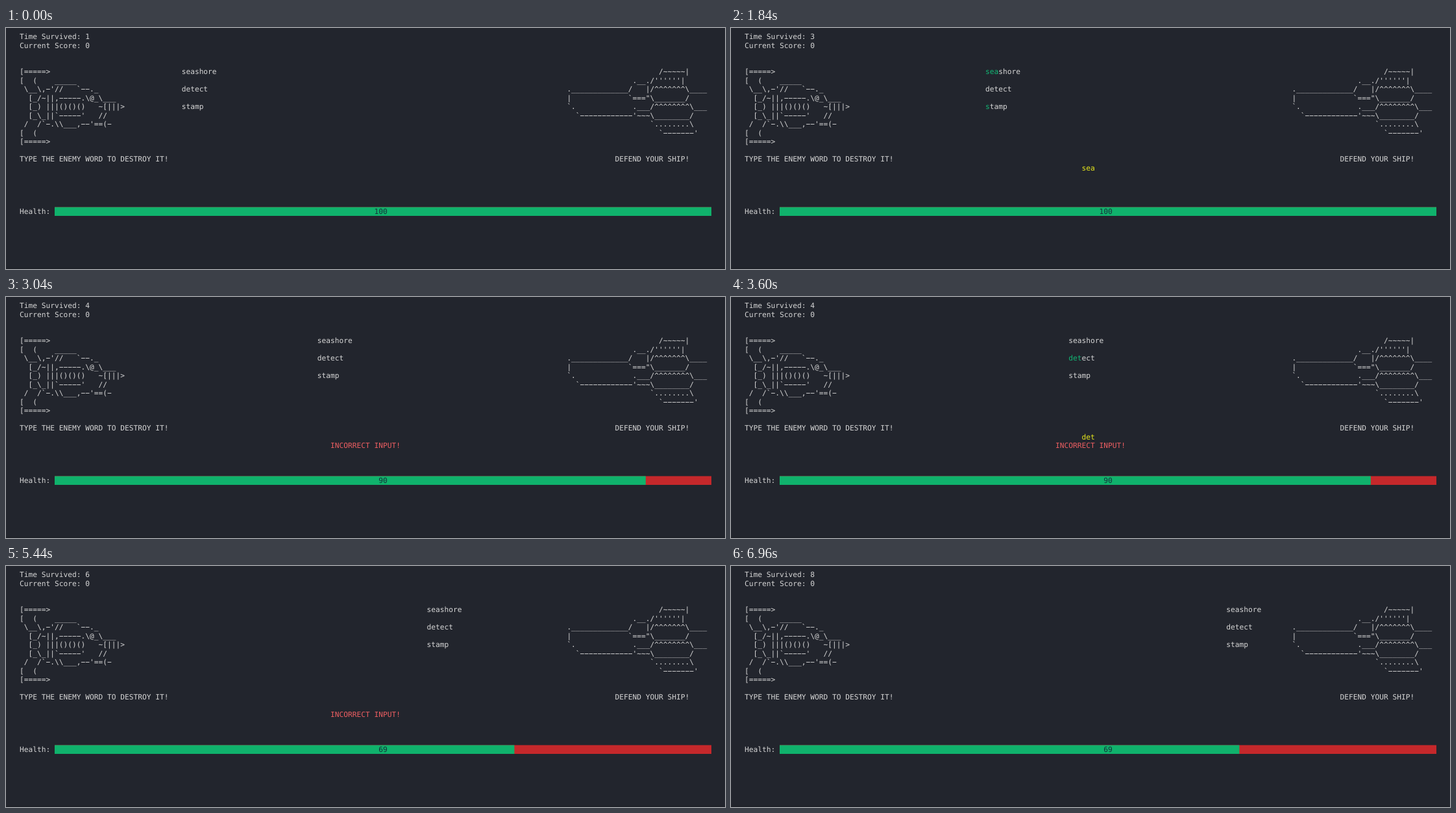
These frames come from a looping animation (1108x372 px, 7040 ms). An HTML page with a canvas:

```html
<!DOCTYPE html>
<html lang="en">
<head>
<meta charset="utf-8">
<title>Typing defence game</title>
<style>
  html, body { margin: 0; width: 100%; height: 100%; overflow: hidden; background: #22252d; }
  canvas { display: block; }
</style>
</head>
<body>
<canvas id="stage" width="1108" height="372"></canvas>
<script>
const ctx = document.getElementById("stage").getContext("2d");

const LOOP = 7040, TICK = 80;
const LEFT = 21, BASELINE = 17, CELL = 6.747, LINE = 13.5;
const COLS = 158, BAR_COL = 8, BAR_CELLS = 150, BAR_ROW = 20;
const COLOR = {
  back: "#22252d", text: "#d6d6d6", match: "#12b674", typed: "#e8e81c",
  error: "#ee5f62", full: "#10b26c", lost: "#c5282b", label: "#17303a"
};

const PLAYER = [
  "[=====>",
  "[  (    _____",
  " \\__\\,-'//   `--._",
  "  [_/~||,-----.\\@_\\___",
  "  [_) |||()()()   ~[|||>",
  "  [_\\_||`-----'   //",
  " /  /`-.\\\\___,--'==(-",
  "[  (",
  "[=====>"
];
const ENEMY = [
  "                     /~~~~~|",
  "               .__./''''''|",
  "._____________/   |/^^^^^^^\\____",
  "|             `===\"\\_______/",
  "`.             .___/^^^^^^^^\\___",
  "  `------------'~~~\\________/",
  "                   `........\\",
  "                     `-------'"
];
const WORDS = ["seashore", "detect", "stamp"];

// Ticks on which the words hold still for one step.
const PAUSES = [3, 8, 13, 18, 23, 27, 34, 40, 47, 52, 59, 65, 73, 81];
// Each attempt: text, time of first key, time between keys, time of submission.
const ATTEMPTS = [
  { text: "sea", start: 880, gap: 80, end: 2160 },
  { text: "det", start: 3200, gap: 160, end: 4160 },
  { text: "sta", start: 4800, gap: 80, end: 5200 }
];
const HEALTH = [100, 90, 79, 69];
const ERROR_END = 6480;

// Draws text on the terminal grid, one character per cell.
function print(text, col, row, color = COLOR.text) {
  ctx.fillStyle = color;
  [...text].forEach((char, i) => {
    if (char !== " ") {
      ctx.fillText(char === "-" ? "\u2212" : char, LEFT + (col + i) * CELL, BASELINE + row * LINE);
    }
  });
}

const printCentered = (text, row, color) =>
  print(text, Math.floor((COLS - text.length) / 2), row, color);

function typedAt(time) {
  const now = ATTEMPTS.find(a => time >= a.start && time < a.end);
  return now ? now.text.slice(0, Math.floor((time - now.start) / now.gap) + 1) : "";
}

function commonPrefix(a, b) {
  let n = 0;
  while (n < a.length && a[n] === b[n]) n++;
  return n;
}

function drawBar(misses) {
  const x = LEFT + BAR_COL * CELL, y = 276.5;
  const width = BAR_CELLS * CELL, good = (BAR_CELLS - 15 * misses) * CELL;
  ctx.fillStyle = COLOR.lost;
  ctx.fillRect(x, y, width, LINE);
  ctx.fillStyle = COLOR.full;
  ctx.fillRect(x, y, good, LINE);
  const label = String(HEALTH[misses]);
  print("Health:", 0, BAR_ROW);
  print(label, BAR_COL + Math.floor((BAR_CELLS - label.length) / 2), BAR_ROW, COLOR.label);
}

function draw(time) {
  const tick = Math.floor(time / TICK);
  time = tick * TICK;
  const typed = typedAt(time);
  const misses = ATTEMPTS.filter(a => time >= a.end).length;
  const wordCol = 37 + tick - PAUSES.filter(p => p <= tick).length;
  const seconds = 1 + Math.floor((time + 300) / 1000);

  ctx.fillStyle = COLOR.back;
  ctx.fillRect(0, 0, 1108, 372);
  ctx.fillStyle = "#1d2027";
  ctx.fillRect(0, 370, 1108, 2);

  print("Time Survived: " + seconds, 0, 0);
  print("Current Score: 0", 0, 1);
  PLAYER.forEach((line, i) => print(line, 0, 4 + i));
  ENEMY.forEach((line, i) => print(line, 125, 4 + i));
  print("TYPE THE ENEMY WORD TO DESTROY IT!", 0, 14);
  print("DEFEND YOUR SHIP!", 136, 14);

  WORDS.forEach((word, i) => {
    const hit = commonPrefix(word, typed), row = 4 + 2 * i;
    print(word.slice(0, hit), wordCol, row, COLOR.match);
    print(word.slice(hit), wordCol + hit, row);
  });

  printCentered(typed, 15, COLOR.typed);
  if (misses && time < ERROR_END) printCentered("INCORRECT INPUT!", 16, COLOR.error);
  drawBar(misses);
}

ctx.font = "11.2px 'DejaVu Sans Mono', monospace";
ctx.textRendering = "geometricPrecision";

const begin = performance.now();
function frame() {
  draw((performance.now() - begin) % LOOP);
  requestAnimationFrame(frame);
}
frame();
</script>
</body>
</html>
```
